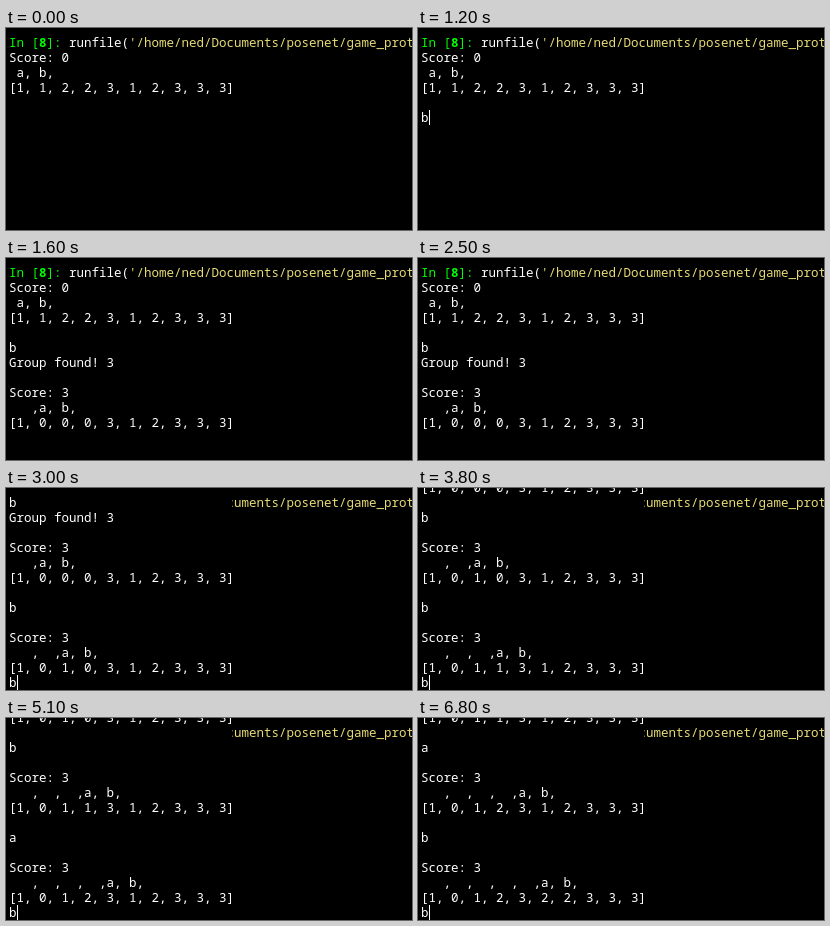
Write an HTML page that moves like this. It is 406x202 px and loops after 8000 ms.

```html
<!DOCTYPE html>
<html lang="en">
<head>
<meta charset="utf-8">
<title>Console game</title>
<style>
html, body { margin: 0; width: 100%; height: 100%; overflow: hidden; background: #000; }
svg { display: block; width: 100vw; height: 100vh; }
text {
  font: 12.5px "Noto Sans Mono", "DejaVu Sans Mono", monospace;
  font-variant-ligatures: none;
  white-space: pre;
  fill: #fff;
}
.lime { fill: #0f0; }
.num { font-weight: bold; }
.str { fill: #e6db74; }
</style>
</head>
<body>
<svg viewBox="0 0 406 202">
  <clipPath id="right"><rect x="226" y="0" width="180" height="24"/></clipPath>
  <rect width="406" height="202"/>
  <g id="prompt"><text x="3" y="19"><tspan class="lime">In [<tspan class="num">8</tspan>]:</tspan> runfile(<tspan class="str">'/home/ned/Documents/posenet/game_prototype.py'</tspan></text></g>
  <g id="lines"></g>
  <rect id="caret" width="1" height="15" fill="#fff"/>
</svg>
<script>
const LOOP = 8000, LEFT = 3, CHAR = 7.5, ROW = 15, BASE = 19, ROWS = 13;
const $ = id => document.getElementById(id);
const prompt = $('prompt'), caret = $('caret');

// rows -1 to 12; row -1 is cut by the top edge
const rows = Array.from({ length: ROWS + 1 }, (_, i) => {
  const el = document.createElementNS('http://www.w3.org/2000/svg', 'text');
  el.setAttribute('x', LEFT);
  el.setAttribute('y', BASE + (i - 1) * ROW);
  return $('lines').appendChild(el);
});

const list = digits => '[' + [...digits].join(', ') + ']';
const hand = n => (n ? '   ' + ',  '.repeat(n - 1) + ',' : ' ') + 'a, b,';
const board = (score, n, digits) => ['Score: ' + score, hand(n), list(digits)];

const boards = ['1122312333', '1000312333', '1010312333',
                '1011312333', '1012312333', '1012322333']
  .map((digits, n) => board(n ? 3 : 0, n, digits));
const keys = ['b', 'b', 'b', 'a', 'b'];

const start = ['', '', ...boards[0], ''];
const found = [...start, 'b', 'Group found! 3', '', ...boards[1], ''];
const second = ['', 'b', 'Group found! 3', '', ...boards[1], '',
                'b', '', ...boards[2], 'b'];
const scrolled = n => [boards[n - 2][2], '', keys[n - 2], '', ...boards[n - 1], '',
                       keys[n - 1], '', ...boards[n], 'b'];

// time, lines, caret row and column (absent when hidden), scrolled prompt
const steps = [
  [0, start],
  [500, start, 5, 0],
  [1000, start],
  [1200, [...start, 'b'], 5, 1],
  [1500, [...start, 'b']],
  [1600, found],
  [2000, found, 12, 0],
  [2500, found],
  [2800, [...found, 'b'], 12, 1],
  [3000, second, 12, 1, true],
  [3800, scrolled(3), 12, 1, true],
  [5100, scrolled(4), 12, 1, true],
  [6800, scrolled(5), 12, 1, true]
];

let shown;
function draw(time) {
  const step = steps.findLast(s => s[0] <= time);
  if (step === shown) return;
  shown = step;
  const [, lines, row, col, cut] = step;
  rows.forEach((el, i) => { el.textContent = lines[i] || ''; });
  prompt.setAttribute('clip-path', cut ? 'url(#right)' : 'none');
  caret.style.display = row === undefined ? 'none' : '';
  if (row !== undefined) {
    caret.setAttribute('x', Math.round(LEFT + col * CHAR));
    caret.setAttribute('y', 7 + row * ROW);
  }
}

const origin = performance.now();
function tick() {
  draw((performance.now() - origin) % LOOP);
  requestAnimationFrame(tick);
}
tick();
</script>
</body>
</html>
```
